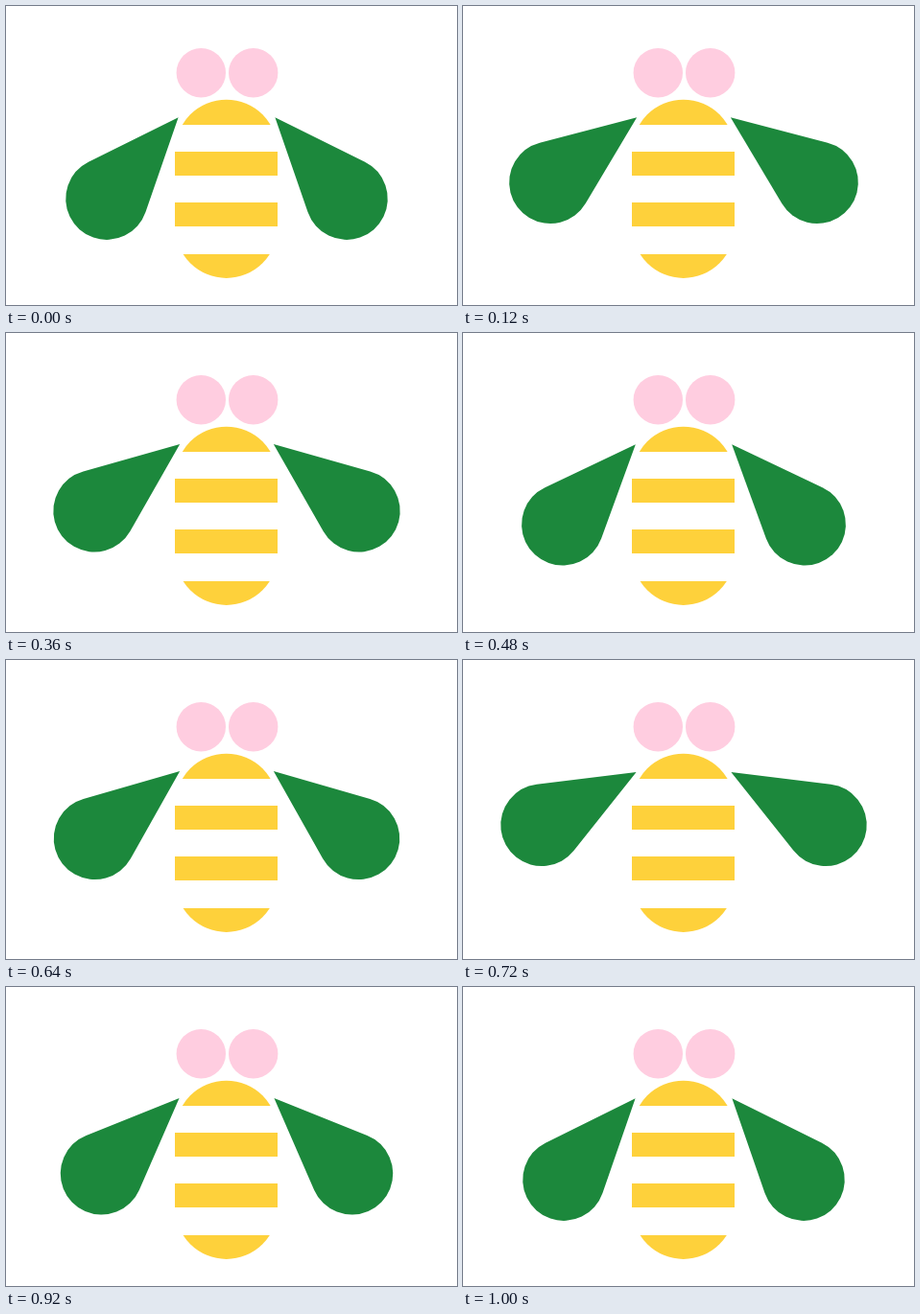
An HTML page with a canvas for the animation above (1040 ms loop, 470 by 312 pixels).

```html
<!DOCTYPE html>
<html lang="en">
<head>
<meta charset="utf-8">
<title>Bee</title>
<style>
  html, body { margin: 0; width: 100%; height: 100%; overflow: hidden; background: #fff; }
  canvas { display: block; width: 470px; height: 312px; }
</style>
</head>
<body>
<canvas id="stage" width="470" height="312"></canvas>
<script>
const ctx = document.getElementById('stage').getContext('2d');
const LOOP = 1040, STEP = 40;
const PINK = '#ffcde0', YELLOW = '#fed13b', GREEN = '#1c883c';
const AXIS = 230;
const RAD = Math.PI / 180;

// Wing lift over time: [ms, lift]
const KEYS = [[0, 0], [215, 1], [520, 0], [535, 0], [740, 1], [1000, 0], [LOOP, 0]];

function lift(t) {
  const i = KEYS.findIndex(k => t < k[0]);
  const [t0, a] = KEYS[i - 1], [t1, b] = KEYS[i];
  const p = (t - t0) / (t1 - t0);
  return a + (b - a) * p * p * (3 - 2 * p);
}

function disc(x, y, r) {
  ctx.beginPath();
  ctx.arc(x, y, r, 0, 2 * Math.PI);
  ctx.fill();
}

// Slice of a round cap between two heights
function cap(cy, top, bottom) {
  ctx.save();
  ctx.beginPath();
  ctx.rect(170, top, 120, bottom - top);
  ctx.clip();
  disc(229.7, cy, 53.3);
  ctx.restore();
}

function wing(u) {
  const r = 42.8, d = 113;
  const spread = Math.PI / 2 + Math.asin(r / d);
  // The tip drifts slightly as the wing turns
  const x = 179.6 + 5.16 * u - 4.26 * u * u;
  const y = 116.2 - 1.38 * u + 2.18 * u * u;
  ctx.save();
  ctx.translate(x, y);
  ctx.rotate((131.3 + 19.9 * u) * RAD);
  ctx.beginPath();
  ctx.moveTo(0, 0);
  ctx.arc(d, 0, r, -spread, spread);
  ctx.closePath();
  ctx.fill();
  ctx.restore();
}

function draw(t) {
  ctx.fillStyle = '#fff';
  ctx.fillRect(0, 0, 470, 312);

  ctx.fillStyle = PINK;
  disc(203.3, 69.7, 25.7);
  disc(257.7, 69.7, 25.7);

  ctx.fillStyle = YELLOW;
  cap(151, 97, 124);
  ctx.fillRect(176, 152, 107, 25);
  ctx.fillRect(176, 205, 107, 25);
  cap(230.6, 259, 285);

  ctx.fillStyle = GREEN;
  const u = lift(t);
  wing(u);
  ctx.save();
  ctx.translate(2 * AXIS, 0);
  ctx.scale(-1, 1);
  wing(u);
  ctx.restore();
}

const start = performance.now();
function tick() {
  const t = (performance.now() - start) % LOOP;
  draw(Math.floor(t / STEP) * STEP);
  requestAnimationFrame(tick);
}
tick();
</script>
</body>
</html>
```
